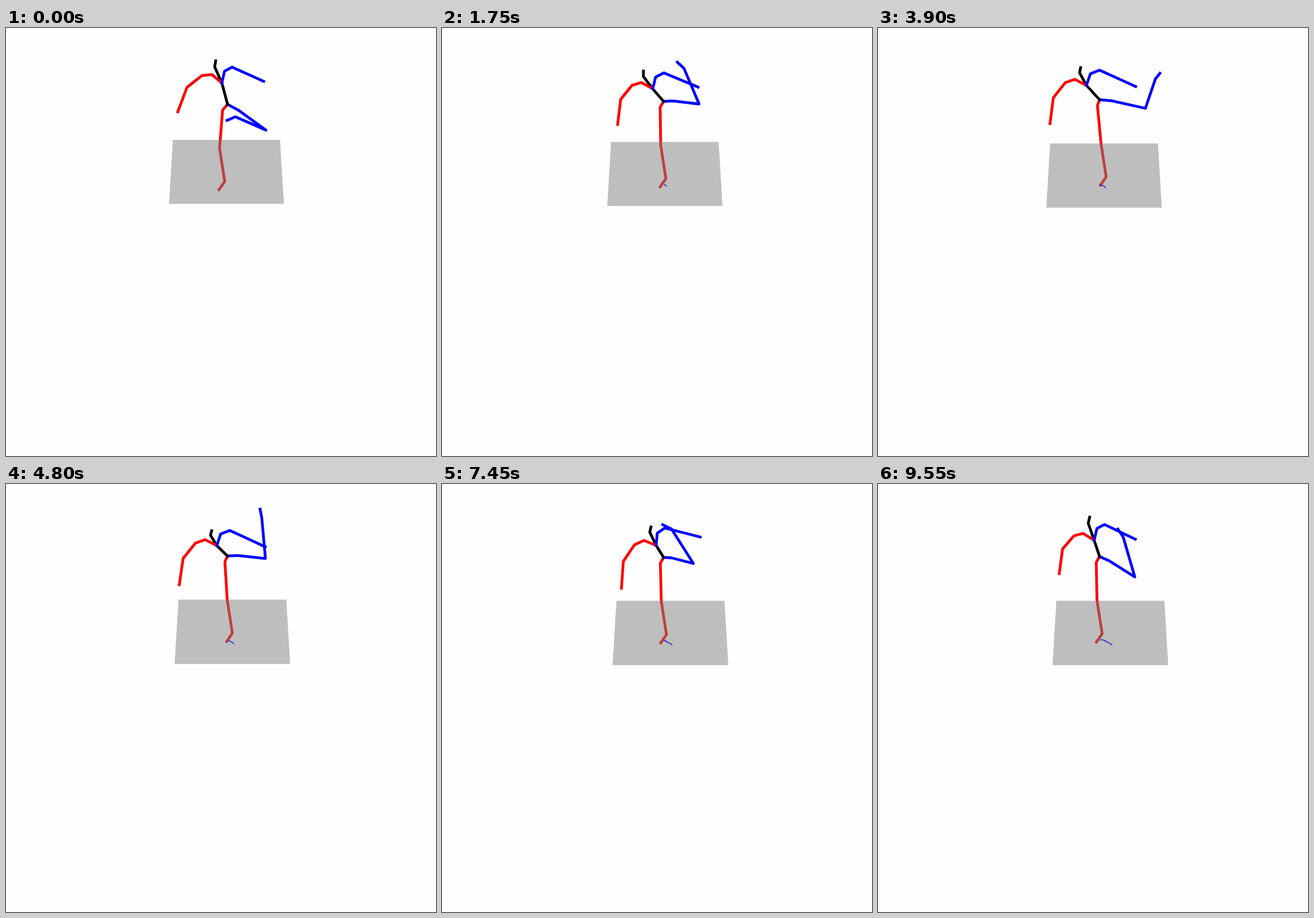
These frames come from a looping animation (751x746 px, 9.6 s). An HTML page:

```html
<!DOCTYPE html>
<html lang="en">
<head>
<meta charset="utf-8">
<title>Stick figure</title>
<style>
  html, body { margin: 0; width: 100%; height: 100%; overflow: hidden; background: #fefefe; }
  svg { display: block; width: 100%; height: 100%; }
  polyline { fill: none; stroke-width: 4.8; stroke-linejoin: round; stroke-linecap: square; }
  .right { stroke: #f00; }
  .left { stroke: #00f; }
  .spine { stroke: #000; }
  #floor { fill: #808080; fill-opacity: .5; }
  #trail { stroke: #3a3acb; stroke-width: 1.3; }
</style>
</head>
<body>
<svg viewBox="0 0 751 746">
  <polyline id="rightLeg" class="right"/>
  <polyline id="leftLeg" class="left"/>
  <polyline id="spine" class="spine"/>
  <polyline id="rightArm" class="right"/>
  <polyline id="leftArm" class="left"/>
  <polygon id="floor"/>
  <polyline id="trail"/>
</svg>
<script>
const LOOP = 9600, STEP = 50, HIP_X = 387;

// Time, hip y, neck, crown, right hand, left hand, left knee, right knee x.
const poses = [
  [0, 133, 377, 96, 366.2, 57.2, 300, 146.2, 450, 93, 454, 178, 373],
  [1750, 128, 368, 106, 351.8, 75, 306.8, 168.2, 447.3, 103, 449, 132.5, 382],
  [2850, 129.5, 372, 110, 367, 79.4, 309.8, 169.2, 454.8, 118.7, 459, 132.5, 386],
  [3900, 125, 364, 100, 353.9, 69, 300.4, 166.7, 450, 102, 467, 140, 389.5],
  [5800, 127, 374, 116, 367, 94, 307.5, 185.2, 456, 117.3, 437, 120, 382.5],
  [7450, 128, 374, 107, 365, 75, 313.4, 181.7, 451, 92.4, 439, 138.5, 383],
  [9550, 126.5, 377.5, 98, 369.7, 57.7, 316.6, 156.2, 449.5, 96.4, 448.5, 162, 382.5]
];

// Time and position of the raised toe, which swings faster than the body.
const toes = [
  [0, 386, 161], [1750, 411, 59.5], [2400, 433, 39], [2850, 447.2, 41.8], [3900, 492.4, 79],
  [4700, 448, 44], [5800, 411, 66.2], [7450, 385.4, 71], [8500, 414, 52], [9550, 419, 78.6]
];

// Time and middle of the floor's far edge.
const drift = [
  [0, 385, 195], [1000, 387.2, 197.4], [2850, 392.3, 200], [3900, 394.8, 201.2],
  [5800, 396, 202], [7450, 399, 203.5], [8800, 403.7, 205], [9550, 405.8, 203.5]
];

// Smooth curve through the keys; returns the values at time t.
function at(keys, t) {
  const last = keys.length - 1;
  let i = 0;
  while (i < last - 1 && t >= keys[i + 1][0]) i++;
  const a = keys[i], b = keys[i + 1];
  const p = keys[Math.max(i - 1, 0)], n = keys[Math.min(i + 2, last)];
  const span = b[0] - a[0], u = Math.min((t - a[0]) / span, 1), v = 1 - u;
  return a.slice(1).map((x, k) => {
    const j = k + 1, y = b[j];
    const m0 = (y - p[j]) / (b[0] - p[0]) * span;
    const m1 = (n[j] - x) / (n[0] - a[0]) * span;
    return (1 + 2 * u) * v * v * x + u * v * v * m0
         + u * u * (3 - 2 * u) * y - u * u * v * m1;
  });
}

// Limb from a to b; each joint is [fraction of the way, sideways offset].
function limb([ax, ay], [bx, by], ...joints) {
  const dx = bx - ax, dy = by - ay, len = Math.hypot(dx, dy);
  const inner = joints.map(([f, side]) =>
    [ax + dx * f - dy / len * side, ay + dy * f + dx / len * side]);
  return [[ax, ay], ...inner, [bx, by]];
}

const draw = (id, pts) => document.getElementById(id).setAttribute("points", pts.join(" "));

function standingLeg(hipY, kneeX) {
  const kneeY = hipY + 76.5;
  return [
    [HIP_X, hipY], [HIP_X - 4.5 + .3 * (kneeX - HIP_X), hipY + 10],
    [kneeX, kneeY], [kneeX + 9, kneeY + 58], [kneeX - 1, kneeY + 72.5]
  ];
}

function floorShape([x, y]) {
  const s = 1 + (y - 195) * .0009, near = y + 111.4 * s;
  return [x - 93.6 * s, y, x + 93.6 * s, y, x + 100.3 * s, near, x - 100.3 * s, near];
}

// The root stays put while the floor slides, so its track drifts with the floor.
function trail(t) {
  const [x, y] = at(drift, t), pts = [];
  for (let s = 0; s <= t; s += STEP) {
    const [fx, fy] = at(drift, s);
    pts.push(388 + x - fx, 272.6 + y - fy + .7 * Math.sin(s / 130));
  }
  return pts;
}

function render(t) {
  const [hipY, nx, ny, cx, cy, rx, ry, lx, ly, kx, ky, kneeX] = at(poses, t);
  const hip = [HIP_X, hipY], neck = [nx, ny], knee = [kx, ky], toe = at(toes, t);
  draw("rightLeg", standingLeg(hipY, kneeX));
  draw("leftLeg", [
    ...limb(hip, knee, [.26, -2]),
    ...limb(knee, toe, [.82, .14 * (kx - toe[0])])
  ]);
  draw("spine", [hip, ...limb(neck, [cx, cy], [.76, -4.5])]);
  draw("rightArm", limb(neck, [rx, ry], [.07, 22], [.24, 30], [.6, 27]));
  draw("leftArm", limb(neck, [lx, ly], [.075, -20.5], [.26, -27], [.7, -11]));
  draw("floor", floorShape(at(drift, t)));
  draw("trail", trail(t));
}

const start = performance.now();
function tick() {
  const t = (performance.now() - start) % LOOP;
  render(Math.floor(t / STEP) * STEP);
  requestAnimationFrame(tick);
}
tick();
</script>
</body>
</html>
```
